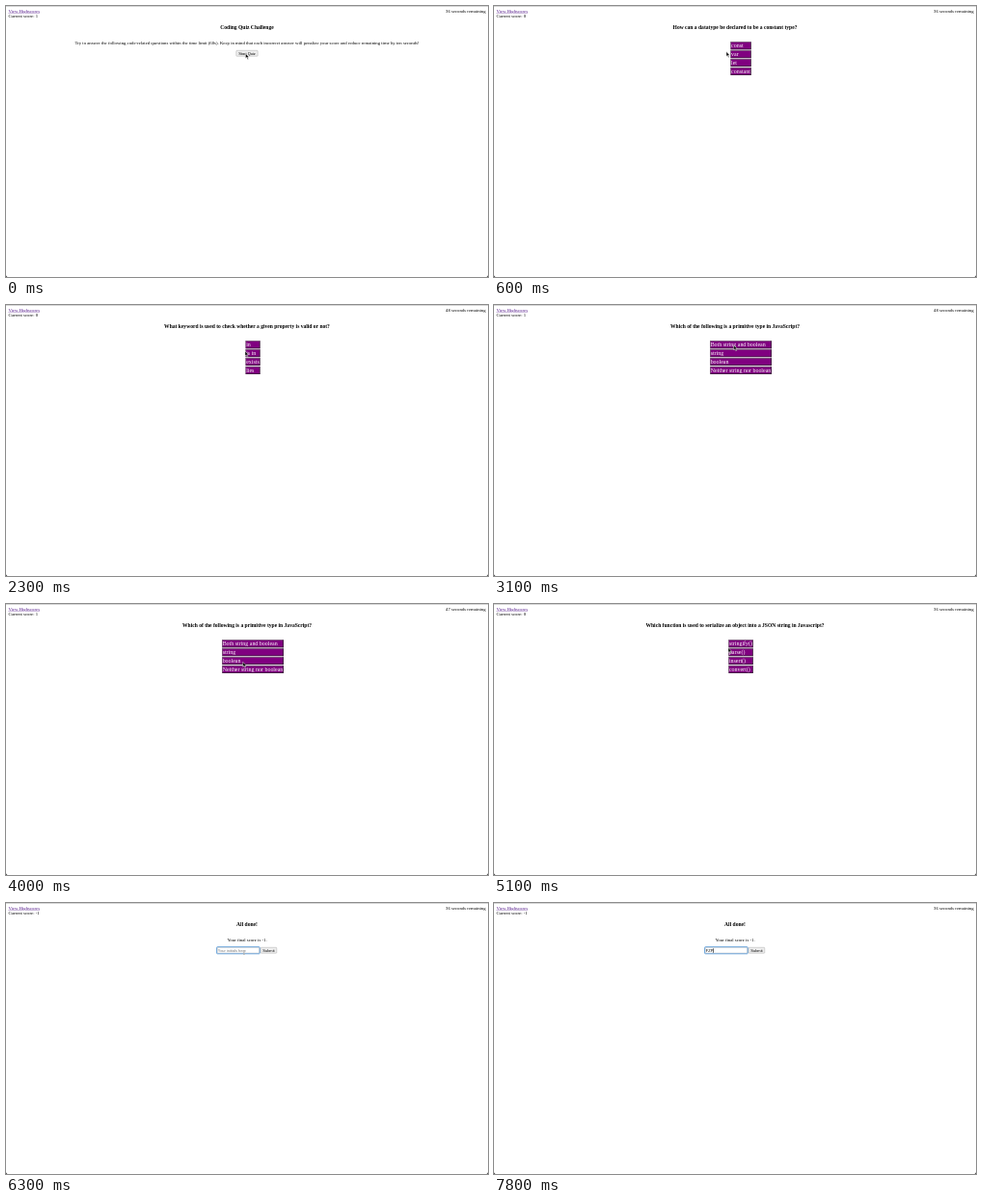
Animation, 500 px wide and 282 px high, one loop 8000 ms. Source, as an HTML page:

```html
<!DOCTYPE html>
<html lang="en">
<head>
<meta charset="utf-8">
<title>Coding Quiz</title>
<style>
  html, body { margin: 0; width: 100%; height: 100%; overflow: hidden; background: #222; }
  #page {
    position: absolute; width: 1680px; height: 948px; overflow: hidden;
    transform: scale(calc(500 / 1680)); transform-origin: 0 0;
    background: #fff; color: #000; border-radius: 0 0 9px 9px;
    font: 16px/18px "Liberation Serif", serif;
  }
  #page > * { position: absolute; }
  #edge { width: 100%; height: 3px; background: #d4d4d4; }
  #left { left: 8px; top: 9px; }
  #left u { color: #551a8b; }
  #timer { right: 8px; top: 9px; }
  h3 { top: 64px; width: 100%; margin: 0; font-size: 18.72px; line-height: 21px; text-align: center; }
  #content { top: 121px; width: 100%; text-align: center; }
  p { margin: 0 0 16px; }
  ul {
    position: absolute; left: 50%; top: 4px; margin: 0 0 0 20px; padding: 0;
    transform: translateX(-50%); width: max-content; list-style: none; text-align: left;
  }
  li {
    margin-bottom: 3px; border: 2px outset #767676; background: purple; color: #fff;
    font-size: 20px; line-height: 23px;
  }
  .button, .field {
    display: inline-block; box-sizing: border-box; height: 21px; border: 1px solid #767676;
    font: 13.333px/19px "Liberation Sans", Arial, sans-serif; vertical-align: top;
  }
  .button { padding: 0 7px; background: #efefef; border-radius: 3px; }
  .field { width: 147px; margin-right: 4px; padding: 0 2px; text-align: left; white-space: nowrap; }
  .focus { outline: 3px solid #5a9bd8; border-radius: 1px; }
  .field i { font-style: normal; color: #757575; }
  .caret { display: inline-block; width: 2px; height: 15px; margin-right: -2px; background: #000; vertical-align: middle; }
  #cursor { left: 0; top: 0; width: 14px; height: 21px; overflow: visible; stroke: #fff; stroke-width: 1.5; }
</style>
</head>
<body>
<div id="page">
  <div id="edge"></div>
  <div id="left"><u>View Highscores</u><br>Current score: <span id="score"></span></div>
  <div id="timer"></div>
  <h3 id="title"></h3>
  <div id="content"></div>
  <svg id="cursor"><path id="pointer"/></svg>
</div>
<script>
const LOOP = 8000, STEP = 100, SCALE = 500 / 1680;
const $ = id => document.getElementById(id);

const ARROW = "M0 0V17L4 13L7 20L10 19L7 12.500H12Z";
const BEAM = "M0 0H2L3 1L4 0H6V1.500H4V14.500H6V16H4L3 15L2 16H0V14.500H2V1.500H0Z";

const list = (...answers) => () => `<ul>${answers.map(a => `<li>${a}</li>`).join("")}</ul>`;

const intro = () => `<p>Try to answer the following code-related questions within the time limit (60s). Keep in mind that each incorrect answer will penalize your score and reduce remaining time by ten seconds!</p><span class="button">Start Quiz</span>`;

function form(t) {
  const focused = t >= 5800;
  const typed = t < 7100 ? "" : t < 7200 ? "F" : t < 7800 ? "FZ" : "FZP";
  const blinkedOff = (t >= 6300 && t < 6800) || t === 7700;
  const caret = focused && !blinkedOff ? '<b class="caret"></b>' : "";
  const text = typed ? typed + caret : caret + "<i>Your initials here</i>";
  return `<p>Your final score is -1.</p><span class="field ${focused ? "focus" : ""}">${text}</span><span class="button">Submit</span>`;
}

// start time, score, heading, content
const screens = [
  [0, 1, "Coding Quiz Challenge", intro],
  [300, 0, "How can a datatype be declared to be a constant type?", list("const", "var", "let", "constant")],
  [1300, 1, "Which of the following keywords is not used to define a variable in JavaScript?", list("dynam", "let", "var", "const")],
  [2300, 0, "What keyword is used to check whether a given property is valid or not?", list("in", "is in", "exists", "lies")],
  [3100, 1, "Which of the following is a primitive type in JavaScript?", list("Both string and boolean", "string", "boolean", "Neither string nor boolean")],
  [4200, 0, "Which function is used to serialize an object into a JSON string in Javascript?", list("stringify()", "parse()", "insert()", "convert()")],
  [5300, -1, "All done!", form]
];

const countdown = [[0, 36], [1300, 59], [2300, 48], [3300, 47], [4300, 36]];

// time, x, y of the pointer tip
const path = [
  [0, 248.5, 49.5], [200, 250, 49], [500, 250, 49], [600, 241, 47.5], [700, 241, 47.5],
  [1000, 251, 48.5], [1500, 251, 48.5], [1900, 248, 48], [2400, 248, 48], [2600, 252, 57],
  [2900, 249, 39.5], [3000, 249, 39.5], [3900, 246.3, 60.3], [4000, 245.7, 60.3],
  [4400, 245.7, 60.3], [4700, 252, 54], [5100, 243, 45.5], [5200, 243, 45.5],
  [5800, 246, 49.3], [LOOP, 246, 49.3]
];

const latest = (rows, t) => rows.filter(row => row[0] <= t).pop();

function pointerAt(t) {
  const a = latest(path, t), b = path[path.indexOf(a) + 1];
  const k = (t - a[0]) / (b[0] - a[0]);
  return [1, 2].map(i => a[i] + (b[i] - a[i]) * k);
}

function draw(t) {
  const [, score, title, content] = latest(screens, t);
  $("score").textContent = score;
  $("timer").textContent = latest(countdown, t)[1] + " seconds remaining";
  $("title").textContent = title;
  $("content").innerHTML = content(t);

  const [x, y] = pointerAt(t);
  $("cursor").style.transform = `translate(${x / SCALE}px, ${y / SCALE}px)`;
  $("cursor").style.display = t < 7100 ? "block" : "none";
  $("pointer").setAttribute("d", t < 5700 ? ARROW : BEAM);
}

let start, shown;
function tick() {
  const now = performance.now();
  start ??= now;
  const t = Math.floor((now - start) % LOOP / STEP) * STEP;
  if (t !== shown) draw(shown = t);
  requestAnimationFrame(tick);
}
tick();
</script>
</body>
</html>
```
